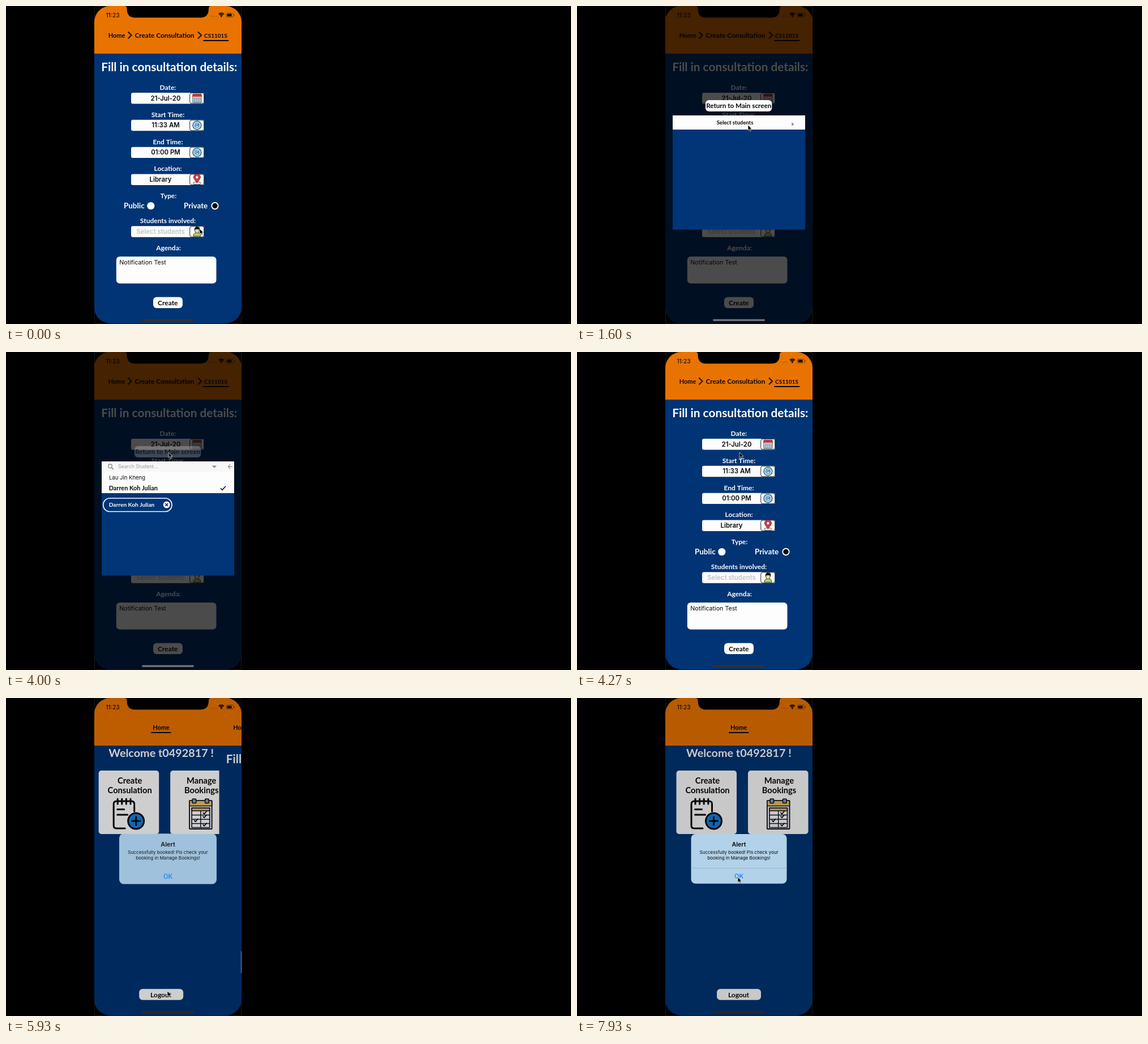
An HTML page with a canvas for the animation above (8000 ms loop, 998x561 px).

```html
<!DOCTYPE html>
<html lang="en">
<head>
<meta charset="utf-8">
<title>Consultation booking</title>
<style>
  html, body { margin: 0; width: 100%; height: 100%; overflow: hidden; background: #000; }
  canvas { display: block; }
</style>
</head>
<body>
<canvas width="998" height="561"></canvas>
<script>
const ctx = document.querySelector('canvas').getContext('2d');
const LOOP = 8000;
const ORANGE = '#e97300', BLUE = '#003474', WHITE = '#fdfdfd', BLACK = '#080808', GREY = '#8c8c8c';
const PHONE = { x: 156, y: 0, w: 260, h: 560 };
const FIRST_STUDENT = 'Lau Jin Kheng', PICKED_STUDENT = 'Darren Koh Julian', USER = 't0492817';

const OPEN_AT = 185, LIST_AT = 1800, PRESS_AT = 2940, PICK_AT = 3090,
      RETURN_AT = 3940, CLOSE_AT = 4030, HOME_AT = 5743, ALERT_AT = 5760;

// Pointer rests: [arrive, leave, x, y]
const stops = [
  [0, 800, 342, 393], [1450, 2050, 302, 210], [2650, 3250, 233, 236],
  [3800, 4450, 287, 177], [5050, 6300, 285, 517], [7600, 8000, 284, 316]
];

const clamp = v => Math.min(1, Math.max(0, v));
const span = (t, start, length) => clamp((t - start) / length);
const easeOut = (p, power) => 1 - (1 - p) ** power;

function paint(fill, stroke, width) {
  if (fill) { ctx.fillStyle = fill; ctx.fill(); }
  if (stroke) { ctx.strokeStyle = stroke; ctx.lineWidth = width; ctx.stroke(); }
}
function box(x, y, w, h, r, fill, stroke, width = 1) {
  ctx.beginPath();
  ctx.roundRect(x, y, w, h, r);
  paint(fill, stroke, width);
}
function disc(x, y, r, fill, stroke, width = 1) {
  ctx.beginPath();
  ctx.arc(x, y, r, 0, 7);
  paint(fill, stroke, width);
}
function shape(d, fill, stroke, width) {
  const path = new Path2D(d);
  if (fill) { ctx.fillStyle = fill; ctx.fill(path); }
  if (stroke) { ctx.strokeStyle = stroke; ctx.lineWidth = width; ctx.stroke(path); }
}
function write(text, x, y, font, size, color, align) {
  ctx.font = `${font.weight} ${size}px ${font.family}`;
  ctx.fillStyle = color;
  ctx.textAlign = align;
  ctx.fillText(text, x, y + size * 0.35);
}
const rounded = { weight: 700, family: 'Lato, sans-serif' };
const system = weight => ({ weight, family: 'Inter, sans-serif' });
const heading = (text, x, y, size, color = BLACK, align = 'center') =>
  write(text, x, y, rounded, size, color, align);
const plain = (text, x, y, size, color = BLACK, align = 'left', weight = 400) =>
  write(text, x, y, system(weight), size, color, align);

function at(x, y, draw, scale = 1) {
  ctx.save();
  ctx.translate(x, y);
  ctx.scale(scale, scale);
  draw();
  ctx.restore();
}
function faded(alpha, draw) {
  ctx.save();
  ctx.globalAlpha *= alpha;
  draw();
  ctx.restore();
}
function dim(alpha) {
  ctx.fillStyle = `rgba(0,0,0,${alpha})`;
  ctx.fillRect(PHONE.x, PHONE.y, PHONE.w, PHONE.h);
}

// Field icons, centred on the origin
const icons = {
  calendar() {
    box(-8, -7, 16, 15, 1, '#e8edf2', '#34495e', 0.8);
    box(-8, -7, 16, 4.5, 1, '#d9383a');
    for (let i = 0; i < 4; i++) {
      box(-6 + i * 3.6, -8.5, 1.2, 3.5, 0.5, '#5d2529');
      for (let j = 0; j < 3; j++) box(-6.3 + i * 3.5, -1 + j * 3, 2.3, 1.9, 0, '#38658c');
    }
  },
  clock() {
    disc(0, 0, 7.4, '#f4fbff', '#286f9d', 1.7);
    ctx.setLineDash([1, 1]);
    disc(0, 0, 5.2, null, '#4192bb', 1.4);
    ctx.setLineDash([]);
    disc(0, 0, 3.9, '#c2e1ee', '#286f9d', 0.8);
    plain('24', 0, 0, 5, '#174d74', 'center', 700);
  },
  pin() {
    ctx.beginPath();
    ctx.ellipse(0, 6.3, 7, 2.4, 0, 0, 7);
    paint('#e4e9ee', '#46566b', 0.9);
    shape('M0 6 C-2 2-6-1-6-4 A6 6 0 0 1 6-4 C6-1 2 2 0 6Z', '#e5353f', '#57242d', 0.9);
    disc(0, -4, 2.6, '#fff', '#57242d', 0.7);
  },
  person() {
    shape('M-6.5 8 C-6.5 3-4 2.5 0 2.5 S6.5 3 6.5 8Z', '#a6dc62', '#26371e', 0.9);
    box(-1.5, 0, 3, 4, 1, '#f3c6a2');
    box(-3.5, -6, 7, 8.5, 3.4, '#f9d4b5', '#2a211d', 0.8);
    shape('M-4.5-1 C-6-9 0-10 2-8.5 C6-9 5-3 4.3-1 L3.5-4 L-3.5-4Z', '#171719');
  }
};

function field(label, value, y, icon, x, color = BLACK) {
  heading(label, 286, y - 19, 12, WHITE);
  box(221, y - 9.7, 129, 19.4, 3, WHITE);
  plain(value, x, y, 11.4, color, 'center', 600);
  box(324.7, y - 9.3, 25, 18.6, 3.5, WHITE, '#20262c', 1);
  at(337.4, y, icons[icon]);
}

function screenBase() {
  ctx.fillStyle = BLUE;
  ctx.fillRect(PHONE.x, 84, PHONE.w, 477);
  ctx.fillStyle = ORANGE;
  ctx.fillRect(PHONE.x, 0, PHONE.w, 84);
}

function formScreen() {
  screenBase();
  heading('Home', 195.5, 52, 11);
  heading('Create Consultation', 280, 52, 11.8);
  heading('CS1101S', 370.5, 52, 10);
  for (const x of [215.5, 339]) shape(`M${x} 45.5l6 6-6 6`, null, '#241a10', 2.2);
  box(348, 60, 45.5, 2, 1, BLACK);

  heading('Fill in consultation details:', 288.3, 107.3, 20.8, WHITE);
  field('Date:', '21-Jul-20', 162.7, 'calendar', 282);
  field('Start Time:', '11:33 AM', 210.5, 'clock', 282);
  field('End Time:', '01:00 PM', 258.4, 'clock', 282);
  field('Location:', 'Library', 306.2, 'pin', 273);
  heading('Type:', 287, 335, 11.8, WHITE);
  heading('Public', 208, 352.5, 13.4, WHITE, 'left');
  disc(255.8, 352.5, 6.6, WHITE);
  heading('Private', 314, 352.5, 13.4, WHITE, 'left');
  disc(369, 352.5, 5.7, '#050505', WHITE, 1.9);
  field('Students involved:', 'Select students', 398, 'person', 273, '#c2c2c4');
  heading('Agenda:', 287, 427, 12, WHITE);
  box(194.8, 442, 176.7, 47.5, 6, WHITE);
  plain('Notification Test', 200.3, 452, 10.7);
  box(260, 513.5, 52, 19.5, 6, WHITE);
  heading('Create', 285.8, 523.3, 12);
}

function newBookingIcon() {
  ctx.lineCap = ctx.lineJoin = 'round';
  shape('M238.5 200V187q0-5-5-5H207q-5 0-5 5v38q0 5 5 5H222', null, BLACK, 3);
  for (let x = 209; x < 236; x += 7.6) shape(`M${x} 178v9`, null, BLACK, 3);
  shape('M208.5 196.5h12M208.5 206h18', null, BLACK, 3);
  disc(241.5, 217, 14, '#1480df', BLACK, 3);
  shape('M234.5 217h14M241.5 210v14', null, BLACK, 3);
}
function bookingsIcon() {
  const ink = '#0c1222';
  box(335.9, 181, 39.6, 50, 1, '#f4f4fa', ink, 1.9);
  box(335.9, 181, 39.6, 9.5, 1, '#ecc05d', ink, 1.6);
  for (const x of [341, 363.5]) box(x, 178, 6.5, 7.5, 1, '#8898ab', ink, 1.6);
  box(340, 194, 31.5, 34.5, 0, '#fff', ink, 1.6);
  box(340, 194, 31.5, 5, 0, '#ecb44e', ink, 1.5);
  shape('M340 206.5h31.5M340 214h31.5M340 221.5h31.5M355.7 199v29.5', null, ink, 1.5);
  for (const [x, y] of [[363, 203], [363, 209.5], [347.5, 216.5], [363, 224]])
    shape(`M${x - 3} ${y - 0.5}l2 2.2 4-4.7`, null, ink, 1.8);
}
function homeScreen() {
  screenBase();
  heading('Home', 285.7, 52, 10.8);
  box(268, 60, 35.5, 2, 1, BLACK);
  heading(`Welcome ${USER} !`, 286, 97.5, 19.8, WHITE);
  box(175.5, 128, 106.5, 112, 5, WHITE);
  box(302, 128, 106.5, 112, 5, WHITE);
  heading('Create', 230.5, 145.5, 14.7);
  heading('Consulation', 230.5, 163, 14.7);
  heading('Manage', 357, 145.5, 14.7);
  heading('Bookings', 357, 163, 14.7);
  ctx.save();
  newBookingIcon();
  bookingsIcon();
  ctx.restore();
  box(247, 513.2, 78, 19.6, 6, WHITE);
  heading('Logout', 285.5, 523.3, 12);
}

function statusBar() {
  shape('M209 0q4.5 0 4.5 4.5q0 16 14 16h116q14.5 0 14.5-16q0-4.5 4.5-4.5z', '#000');
  plain('11:23', 188.5, 16, 10.2, '#1c1206', 'center', 500);
  for (let i = 0; i < 4; i++) disc(362 + i * 3.2, 18, 0.8, '#8d4b0c');
  for (const r of [2, 4.4, 6.6]) {
    ctx.beginPath();
    ctx.arc(380.3, 19, r, Math.PI * 1.25, Math.PI * 1.75);
    paint(null, '#171008', 1.7);
  }
  disc(380.3, 18.7, 1.1, '#171008');
  box(389.2, 12.5, 12.6, 7, 2, null, '#70400f', 0.9);
  box(390.5, 13.8, 8.2, 4.4, 1, '#171008');
  box(402.7, 14.8, 1, 2.6, 0.5, '#70400f');
}

function closedList() {
  box(169, 193, 234, 25, 0, WHITE);
  heading('Select students', 279, 205.3, 9.5);
  shape('M379.3 205l4 3.5-4 3.5z', GREY);
}
function openList(t) {
  box(169, 193, 234, 56, 0, WHITE);
  box(169, 193, 234, 18, 0, '#f7f7f8');
  disc(184, 201.3, 3.3, null, GREY, 1.3);
  shape('M186.3 203.6l3.5 3.5', null, GREY, 1.5);
  plain('Search Student...', 198, 202.3, 8.7, '#9a9a9c');
  shape('M363.7 200.5h8.6l-4.3 4.3z', GREY);
  shape('M400 202.3h-7.5m3.7-3.9l-3.9 3.9 3.9 3.9', null, GREY, 1.2);
  plain(FIRST_STUDENT, 182, 221.3, 9.5);
  if (t >= PICK_AT) {
    heading(PICKED_STUDENT, 181.7, 240, 10.9, BLACK, 'left');
    shape('M379 240.3l3 3 6-6.5', null, BLACK, 1.5);
    box(171.7, 258, 121.3, 23.5, 11.7, null, WHITE, 1.7);
    heading(PICKED_STUDENT, 181.7, 269.5, 10.2, WHITE, 'left');
    disc(283.7, 269.5, 5.9, WHITE);
    shape('M281.3 267.1l4.8 4.8m0-4.8l-4.8 4.8', null, BLUE, 1.5);
  } else {
    faded(t >= PRESS_AT ? 0.27 : 1, () => plain(PICKED_STUDENT, 181.7, 240, 9.6));
  }
}
function modal(t) {
  const shown = easeOut(span(t, OPEN_AT, 300), 3);
  const hidden = span(t, CLOSE_AT, 220);
  if (!shown || hidden === 1) return;
  const pressed = t >= RETURN_AT;
  dim(0.7 * shown * (1 - hidden));
  at(0, 440 * (1 - shown + hidden ** 2), () => {
    faded(pressed ? 0.24 : 1, () => box(227, 166, 117.3, 20, 6, WHITE));
    faded(pressed ? 0.8 : 1, () => heading('Return to Main screen', 285.7, 176, 11.7));
    box(169, 193, 234, 201.5, 0, '#003577');
    t < LIST_AT ? closedList() : openList(t);
  });
}

function alertBox(t) {
  const p = span(t, ALERT_AT, 250), shown = easeOut(p, 2);
  if (!p) return;
  dim(0.21 * shown);
  faded(shown, () => at(286, 284, () => {
    box(-84.5, -44, 169, 87.5, 8, '#b1d2e9');
    plain('Alert', 0, -25.5, 10.7, BLACK, 'center', 600);
    plain('Successfully booked! Pls check your', 0, -12, 8, BLACK, 'center');
    plain('booking in Manage Bookings!', 0, -2, 8, BLACK, 'center');
    faded(span(p, 0.8, 0.2), () => box(-84.5, 15.7, 169, 0.8, 0, '#8dabc2'));
    plain('OK', 0, 30.3, 10.9, '#087cff', 'center', 500);
  }, 1 + 0.18 * (1 - shown)));
}

function pointer(t) {
  const i = stops.findLastIndex(stop => t >= stop[0]);
  const [, leave, x, y] = stops[i];
  const [arrive, , nextX, nextY] = stops[i + 1] || [LOOP + 1, 0, x, y];
  const p = span(t, leave, arrive - leave), k = p * p * (3 - 2 * p);
  at(x + (nextX - x) * k, y + (nextY - y) * k, () =>
    shape('M0 0V9.5L2.2 7.5L3.8 11L5.5 10.2L4 6.9H7Z', '#050505', '#e8e8e8', 0.7));
}

function render(t) {
  ctx.fillStyle = '#000';
  ctx.fillRect(0, 0, 998, 561);
  box(156.5, 0.5, 259, 560, 0, null, '#1b1b1b', 1);
  ctx.save();
  ctx.beginPath();
  ctx.roundRect(PHONE.x, PHONE.y, PHONE.w, PHONE.h, 28);
  ctx.clip();
  const back = easeOut(span(t, HOME_AT, 500), 4);
  if (back) at(-78 * (1 - back), 0, homeScreen);
  if (back < 1) at(260 * back, 0, formScreen);
  statusBar();
  const modalOpen = t >= OPEN_AT && t < CLOSE_AT + 220;
  modal(t);
  box(240, 552.5, 92, 3.2, 1.6, modalOpen ? '#77777a' : '#3d3028');
  alertBox(t);
  ctx.restore();
  pointer(t);
}

function tick() {
  render(performance.now() % LOOP);
  requestAnimationFrame(tick);
}
tick();
</script>
</body>
</html>
```
